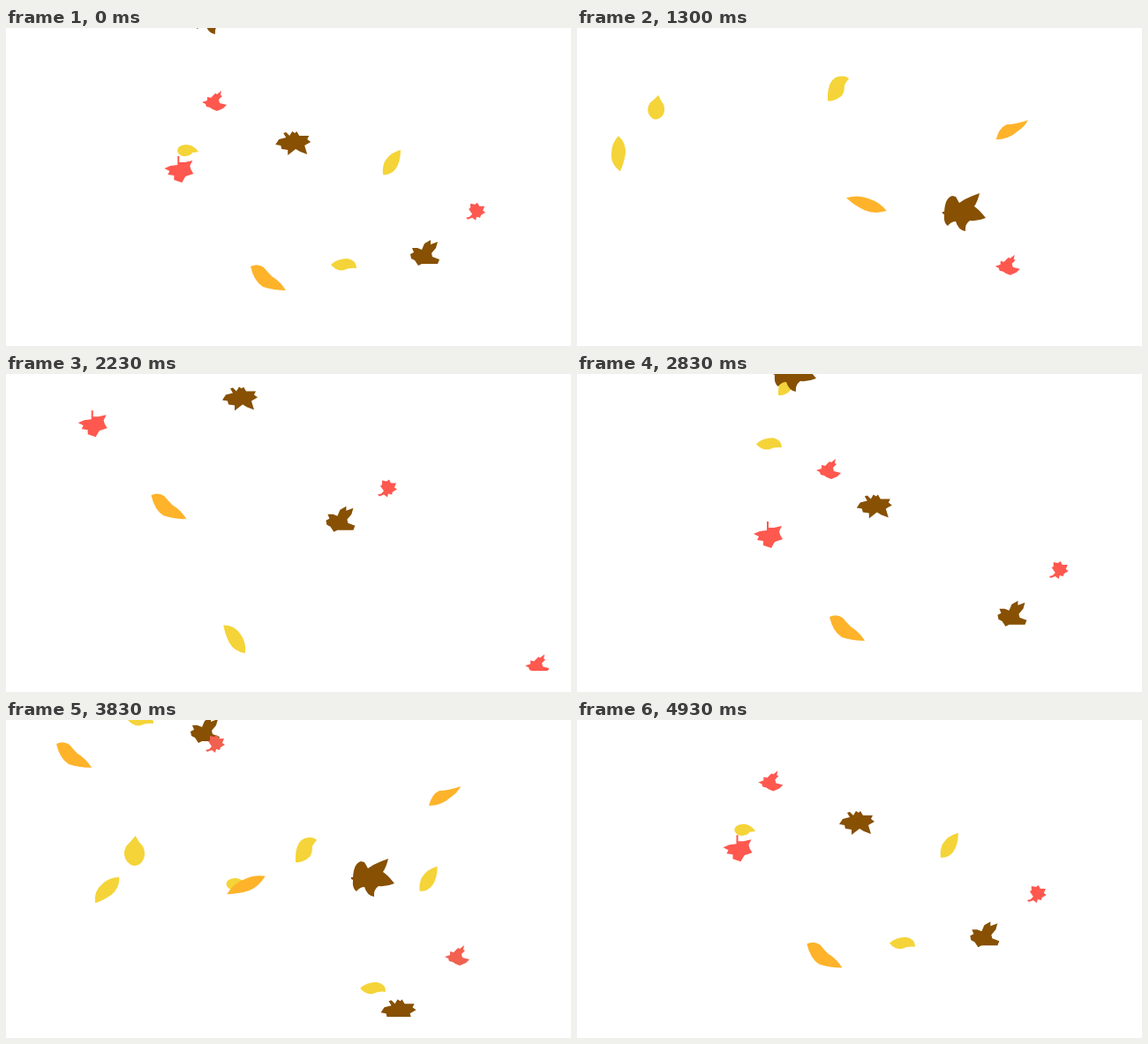
An HTML page with a canvas that plays this animation: 640 by 360 pixels, repeating every 5.01 s.

```html
<!DOCTYPE html>
<html lang="en">
<head>
<meta charset="utf-8">
<title>Falling leaves</title>
<style>
html, body { margin: 0; width: 100%; height: 100%; overflow: hidden; background: #fff; }
canvas { display: block; }
</style>
</head>
<body>
<canvas id="stage" width="640" height="360"></canvas>
<script>
const ctx = document.getElementById('stage').getContext('2d');
const DURATION = 5010;
const LOOP = 100.4; // steps until a leaf carries on across the loop seam
const LIFE = 40;

const shape = d => new Path2D(d);
const roundLeaf = shape('M12 1Q6 -7 -2 -7Q-12 -6 -12 0Q-10 7 -2 6Q4 5 5 2Q9 2 12 1Z');
const tallLeaf = shape('M10 -14Q-2 -11 -8 -1Q-11 6 -10 14Q-2 15 4 8Q10 0 10 -14Z');
const crescent = shape('M-15 0Q-8 -7 4 -7Q14 -5 14 4Q6 3 0 6Q-8 8 -15 0Z');
const hookLeaf = shape('M12 -11Q8 -16 -2 -13Q-13 -8 -12 14Q-4 15 4 8Q7 4 7 -4Q9 -8 12 -11Z');
const ovalLeaf = shape('M-20 2Q-12 -9 0 -8Q12 -8 20 0Q12 9 0 8Q-12 6 -20 2Z');
const drop = shape('M18 0Q10 -6 6 -10Q-4 -15 -12 -8Q-20 0 -12 8Q-4 14 6 9Q12 3 18 0Z');
const wavyLeaf = shape('M-20 -13Q-12 -17 -5 -12Q-1 -7 4 -2Q14 4 20 14Q6 14 -6 10Q-16 4 -20 -13Z');
const risingLeaf = shape('M-18 11Q-15 -2 -6 -6Q4 -6 18 -11Q15 -4 6 2Q-4 11 -18 11Z');
const slimLeaf = shape('M-24 0Q-12 -8 0 -7Q14 -7 24 0Q12 8 0 7Q-14 5 -24 0Z');
const wideMaple = shape('M-11 -11L-8 -12L-4 -8L-1 -13L2 -11L4 -13L7 -8L18 -8L16 -4L20 -1L13 3L16 13L8 10L3 7L-6 14L-6 8L-13 7L-14 3L-20 2L-16 -4L-8 -6Z');
const tiltMaple = shape('M-16 1L-12 -1L-14 -6L-8 -6L-3 -4L0 -11L7 -15L7 -10L15 -13L13 -6L8 0L9 4L17 7L15 12L-3 12L-7 14L-11 8L-15 6Z');
const bigMaple = shape('M-24 0L-22 0Q-21 -16 -13 -18L-9 -17L-5 -10Q2 -15 10 -18L18 -21Q16 -12 12 -6Q17 -3 25 7Q16 11 7 10Q1 14 2 22Q-6 21 -9 11Q-14 11 -18 16Q-23 13 -22 3L-24 2Z');
const pointMaple = shape('M-14 1L-8 -1L-8 -5L-4 -4L1 -9L3 -8L8 -12L7 -7L9 -6L5 -2L6 2L14 4L10 8L3 11L-2 9L-5 7L-9 6L-10 3Z');
const stemMaple = shape('M-2 -15L0 -15L0 -8L6 -8L15 -10L12 -4L13 0L16 5L10 7L7 8L3 15L-6 12L-6 7L-13 6L-11 2L-17 -1L-10 -4L-2 -5Z');
const smallMaple = shape('M-11 7L-7 6L-4 3L-8 -3L-6 -4L-6 -9L-1 -8L2 -10L4 -6L10 -6L8 -1L11 1L6 4L5 7L1 6L0 10L-4 7L-9 9Z');

// Each leaf: shape, step offsets of its repeats, then keys of [step, x, y, angle].
const yellow = [
  [roundLeaf, [0, LOOP, 28], [88, 84, 16], [100.4, 206, 139], [117.4, 438, 316]],
  [tallLeaf, [0, LOOP, 27.5], [88, 287, 46], [100.4, 437, 152], [117.4, 584, 243]],
  [crescent, [0, LOOP, 26.7], [77, 153, 0], [88, 260, 129], [100.4, 383, 268]],
  [hookLeaf, [0, 45.8], [77, 340, 147], [88, 433, 313]],
  [ovalLeaf, [0, 45], [77, 114, 192, -44], [88, 237, 283, 40]],
  [drop, [0, 45.3], [62.3, 24, 32, 0], [77, 146, 149, -88], [88, 284, 309, 0]]
];
const brown = [
  [wideMaple, [0, LOOP, 45.4], [88, 250, 2], [99, 317, 116], [117.4, 419, 287]],
  [tiltMaple, [0, LOOP, 45.5], [77, 225, 12], [88, 352, 139], [100.4, 474, 255]],
  [bigMaple, [0], [0, 235, -15], [17, 368, 126], [34, 500, 285]],
  [bigMaple, [0], [57, 246, -2], [77, 415, 178], [88, 497, 280]]
];
const orange = [
  [wavyLeaf, [0, LOOP], [77, 77, 40], [88, 165, 146], [100.4, 297, 283]],
  [wavyLeaf, [0], [34, 73, 24], [57, 306, 288]],
  [risingLeaf, [0], [17, 417, 48], [34, 560, 175]],
  [risingLeaf, [0], [77, 497, 86], [88, 593, 167]],
  [slimLeaf, [0], [17, 240, 115, 45], [34, 406, 275, -6]],
  [slimLeaf, [0], [57, 92, -28, 33], [77, 272, 187, -25], [88, 368, 293, -55]]
];
const red = [
  [pointMaple, [0, LOOP], [100.4, 236, 83], [117.4, 413, 218], [134.4, 543, 302]],
  [pointMaple, [0], [57, 285, 108], [77, 511, 267], [88, 598, 320]],
  [stemMaple, [0, LOOP, 45.5], [88, 74, 30], [117.4, 364, 338]],
  [smallMaple, [0, LOOP, 45.25], [77, 237, 27], [88, 404, 112], [117.4, 604, 339]]
];

// Smooth line or parabola through the keys
function valueAt(keys, column, s) {
  return keys.reduce((sum, key) => {
    const weight = keys.reduce((w, other) =>
      other === key ? w : w * (s - other[0]) / (key[0] - other[0]), 1);
    return sum + weight * (key[column] || 0);
  }, 0);
}

function drawLeaves(leaves, color, step) {
  ctx.fillStyle = color;
  for (const [path, offsets, ...keys] of leaves) {
    for (const offset of offsets) {
      const s = step + offset;
      if (Math.abs(s - keys[1][0]) > LIFE) continue;
      const size = path === drop ? Math.min(1, (s - 55) / 20) : 1;
      if (size <= 0) continue;
      ctx.save();
      ctx.translate(valueAt(keys, 1, s), valueAt(keys, 2, s));
      ctx.rotate(valueAt(keys, 3, s) * Math.PI / 180);
      ctx.scale(size, size);
      ctx.fill(path);
      ctx.restore();
    }
  }
}

// Red turns duller for a while near the end of the loop
function redAt(step) {
  const mix = Math.max(0, 1 - Math.abs(step - 88) / (step < 88 ? 17 : 11));
  return `rgb(${254 - 34 * mix}, ${88 + 26 * mix}, ${79 + 2 * mix})`;
}

// Steps alternate between 30 and 70 ms
function stepAt(time) {
  return Math.min(99, 2 * Math.floor(time / 100) + (time % 100 >= 30 ? 1 : 0));
}

function draw(step) {
  ctx.fillStyle = '#fff';
  ctx.fillRect(0, 0, 640, 360);
  ctx.save();
  ctx.beginPath();
  ctx.rect(18, 0, 597, 336);
  ctx.clip();
  drawLeaves(yellow, '#f4d438', step);
  drawLeaves(brown, '#875003', step);
  drawLeaves(orange, '#feb32a', step);
  drawLeaves(red, redAt(step), step);
  ctx.restore();
}

const start = performance.now();
function tick() {
  draw(stepAt((performance.now() - start) % DURATION));
  requestAnimationFrame(tick);
}
tick();
</script>
</body>
</html>
```
